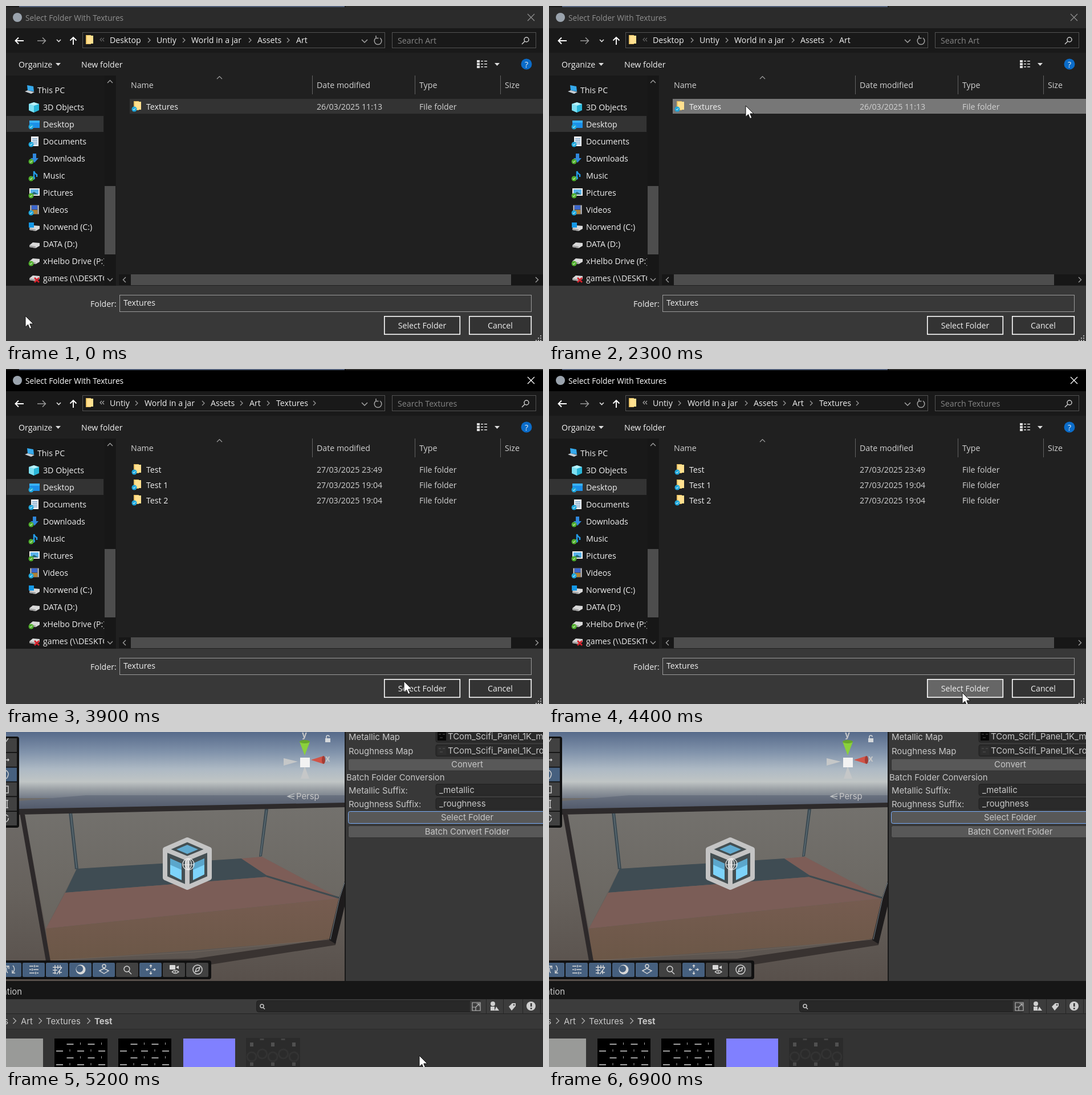
Animation, 942 px wide and 588 px high, one loop 7000 ms. Source, as an HTML page:

```html
<!DOCTYPE html>
<html lang="en">
<head>
<meta charset="utf-8">
<title>Select Folder</title>
<style>
html, body { margin: 0; width: 100%; height: 100%; overflow: hidden; background: #202020; }
svg { display: block; width: 100%; height: 100%; }
text { font: 14.2px "Open Sans", "Noto Sans", sans-serif; fill: #f0f0f0; white-space: pre; }
.title { font-size: 13.7px; }
.editor text { font: 14.9px Inter, Roboto, sans-serif; fill: #c8c8c8; }
.mid { text-anchor: middle; }
.end { text-anchor: end; }
text.dim { fill: #868686; }
text.soft { fill: #d2d2d2; }
.editor text.bold { font-weight: 700; }
.timed { opacity: 0; }
</style>
</head>
<body>
<svg id="stage" viewBox="0 0 942 588" preserveAspectRatio="none"></svg>
<script>
const LOOP = 7000;
const at = ms => (ms / LOOP * 100).toFixed(3) + '%';
const rules = [];

const rect = (x, y, w, h, fill, more = '') => `<rect x="${x}" y="${y}" width="${w}" height="${h}" fill="${fill}" ${more}/>`;
const poly = (points, fill, more = '') => `<polygon points="${points}" fill="${fill}" ${more}/>`;
const path = (d, stroke = '#c8c8c8', width = 1.5, fill = 'none') =>
  `<path d="${d}" stroke="${stroke}" stroke-width="${width}" fill="${fill}"/>`;
const disc = (x, y, r, fill, more = '') => `<circle cx="${x}" cy="${y}" r="${r}" fill="${fill}" ${more}/>`;
const text = (x, y, s, cls = '') => `<text x="${x}" y="${y}" class="${cls}">${s}</text>`;
const move = (x, y, body) => `<g transform="translate(${x} ${y})">${body}</g>`;
const chevron = (x, y, color = '#9a9a9a', s = 4) => path(`M${x - s / 2} ${y - s}l${s} ${s}l${-s} ${s}`, color, 1.3);
const gradient = (id, stops) => `<linearGradient id="${id}" x2="0" y2="1">` +
  stops.map(([o, c]) => `<stop offset="${o}" stop-color="${c}"/>`).join('') + '</linearGradient>';

// Wraps content so that it is visible only during the given spans of the loop.
function during(spans, body) {
  const name = 'span' + rules.length;
  const stops = spans.map(([a, b]) => `${at(a)}{opacity:1}${b < LOOP ? at(b) + '{opacity:0}' : ''}`).join('');
  const first = spans[0][0] ? '0%{opacity:0}' : '';
  const last = spans.at(-1)[1] < LOOP ? '100%{opacity:0}' : '100%{opacity:1}';
  rules.push(`@keyframes ${name}{${first}${stops}${last}}.${name}{animation:${name} ${LOOP}ms step-end infinite}`);
  return `<g class="timed ${name}">${body}</g>`;
}

/* ---------- editor window ---------- */
function scene() {
  let s = rect(0, 0, 594, 118, 'url(#sky)') + rect(0, 116, 594, 321, 'url(#ground)');
  s += poly('23,121 140,111 594,111 594,126 23,135', 'url(#lid)');
  s += poly('33,145 594,131 594,262 584,291 449,219 413,222 124,240 70,345', 'url(#wall)');
  s += poly('110,141 116,141 127,240 121,241', '#3c4a52') + path('M113.5 143L124 239', '#6c7d84', 1);
  s += poly('454,135 460,135 449,218 444,219', '#3c4a52') + path('M457 137L446.5 217', '#6c7d84', 1);
  s += poly('124,240 413,222 461,254 104,282', '#3f4c53');
  s += poly('413,222 449,219 584,291 461,254', '#7d5d57');
  s += poly('104,282 461,254 584,292 70,345', '#7b5d57');
  s += path('M457 253L584 291', '#3f4b50', 3);
  s += poly('70,345 584,292 567,365 75,402', 'url(#front)');
  s += poly('22,135 594,124 594,132 22,145', '#2d2a2b');
  s += poly('24,142 33,145 78,402 70,402', '#2d292a');
  s += poly('70,402 330,398 567,363 579,366 578,374 360,408 70,408', '#393331');
  s += poly('594,262 594,306 578,372 567,365 584,292', '#1d1b1c');
  s += path('M594 264L585 292L569 364', '#78858d', 1) + path('M78 401L330 386L567 364', '#776a61', .7);
  return s + sceneCube() + axes();
}

function sceneCube() {
  const side = poly('-30,-9 -10,0 -10,29 -30,19', '#7dd3fa') + poly('-30,-9 -10,0 -10,11 -30,2', '#5ba6cb');
  return poly('318,189 357,206 357,256 318,273 279,256 279,206', '#454f52') +
    poly('318,198 337,206 318,214 299,206', '#62abd0') +
    move(318, 231, side + `<g transform="scale(-1 1)">${side}</g>`) +
    `<g stroke-linejoin="round">${path('M318 189L357 206V256L318 273L279 256V206ZM279 206L318 222L357 206M318 222V273', '#c4c4c4', 8)}</g>` +
    path('M310 232a10 10 0 1 0 20 0a10 10 0 1 0-20 0M310 233h20M320 222v20M320 222c-7 5-7 15 0 20c7-5 7-15 0-20', '#eee', 1.2);
}

function axes() {
  return poly('487,46 512,52 487,59', '#c5c7c8') + poly('524,60 532,82 517,82', '#c5c7c8') +
    poly('515,17 533,17 524,41', '#8bd13b') + `<ellipse cx="524" cy="17" rx="9" ry="3" fill="#68a62c"/>` +
    poly('535,49 557,42 557,56', '#d05448') + `<ellipse cx="557" cy="49" rx="3" ry="7" fill="#a33c34"/>` +
    rect(516, 45, 17, 17, '#f2f2f2') + text(519, 10, 'y', 'bold') + text(560, 52, 'x', 'bold') +
    rect(560, 11, 9, 7, '#d5d8db') + path('M562 11V8.500a2.500 2.500 0 0 1 5 0', '#d5d8db') +
    path('M506 108L494 113L506 118M495 113h11', '#bfc2c4', 1.3) + text(509, 118, 'Persp');
}

function toolbars() {
  const blue = '#46607f', grey = '#414141';
  let s = rect(-5, 8, 28, 160, '#111', 'rx="4"');
  const marks = ['M0 17l4-6', 'M0 49h5m-2-2l2 2l-2 2', 'M0 67q5 4 4 8q-1 5-4 7', 'M0 95h4v12h-4', 'M0 120h4m-2 0v13m-2 0h4', 'M0 145l4 3m-4 10q5-3 4-7'];
  marks.forEach((d, i) => s += rect(-4, 11 + i * 25.8, 23, 24, i === 2 ? blue : grey) + path(d, '#d0d0d0', 1.4));
  s += rect(-5, 401, 365, 33, '#111', 'rx="4"');
  const icons = [
    'M-5 6a8 8 0 0 1 1-12m-4 0h5v5M4-7a8 8 0 0 1 0 12m4 1h-5v-5',
    'M-8-6h7M3-6h5M-8 0h3M-1 0h9M-8 6h9M5 6h3M1-8v4M-3-2v4M3 4v4',
    'M-4-8v16M1-8v7M5-8v5M-8-4h16M-8 1h8M-8 6h6M-1 8l9-12M4 8v-6M8 5h-5',
    '',
    'M-8 2l8-4l8 4l-8 5zM-3-6a3 3 0 1 1 6 0a3 3 0 1 1-6 0',
    'M4-1a5 5 0 1 1-10 0a5 5 0 1 1 10 0M2 3l5 5',
    'M0-8v5M0 3v5M-8 0h5M3 0h5M-2-6l2-2l2 2M-2 6l2 2l2-2M-6-2l-2 2l2 2M6-2l2 2l-2 2',
    'M-4 4q6-5 12 0q-6 5-12 0M1 4h2',
    'M8 0a8 8 0 1 1-16 0a8 8 0 1 1 16 0M-4 4l2-6l6-2l-2 6z'];
  const solids = {
    3: disc(0, 0, 8.5, '#d8d8d8') + disc(-1.8, -1.2, 6, blue),
    7: rect(-8, -8, 10, 8, '#d8d8d8', 'rx="1"') + poly('3,-4 8,-7 8,-1', '#d8d8d8')
  };
  icons.forEach((d, i) =>
    s += rect(-12 + i * 41, 405, 39, 25, i < 5 || i === 6 ? blue : grey, 'rx="2"') +
      move(8 + i * 41, 417, path(d, '#d8d8d8', 1.4) + (solids[i] || '')));
  return s;
}

function inspector() {
  const field = y => rect(754, y, 200, 20, '#2a2a2a', 'stroke="#202020" rx="3"');
  const button = (y, label, x, more = '') => rect(600.5, y, 420, 21, '#585858', `rx="3" stroke="#303030" ${more}`) + text(x, y + 15, label, 'mid');
  const thumb = (y, c) => rect(757, y, 15, 15, c) + path(`M759 ${y + 4}h4m3 0h4M761 ${y + 10}h5`, '#555', 1);
  return rect(594, 0, 2, 437, '#191919') + rect(596, 0, 346, 437, '#383838') +
    field(-2) + field(22.5) + thumb(0, '#060606') + thumb(25, '#2f2f2f') +
    text(601, 14, 'Metallic Map') + text(775, 13, 'TCom_Scifi_Panel_1K_metallic') +
    text(601, 38.5, 'Roughness Map') + text(775, 37.5, 'TCom_Scifi_Panel_1K_roughness') +
    button(47, 'Convert', 809) + text(597, 84.5, 'Batch Folder Conversion') +
    field(91.5) + text(601, 107.5, 'Metallic Suffix:') + text(760, 106.5, '_metallic') +
    field(116) + text(601, 131.5, 'Roughness Suffix:') + text(760, 130.5, '_roughness') +
    button(139.5, 'Select Folder', 809, 'style="stroke:#7baefa"') + button(164.5, 'Batch Convert Folder', 809);
}

function panelTile(x) {
  let dashes = '', ticks = '';
  for (let row = 0; row < 4; row++)
    for (let col = 0; col < 3; col++) {
      const cx = x + 9 + col * 37 + (row % 2 ? 0 : 18.5), y = 548 + row * 12;
      if (cx + 7 < x + 93) dashes += `M${cx - 6} ${y}h12`;
      if (cx + 19 < x + 93) ticks += `M${cx + 18} ${y - 3}v4`;
    }
  return rect(x, 538, 93, 50, '#000') + path(dashes, '#d5d5d5', 1.6) + path(ticks, '#a0a0a0', 1);
}

function project() {
  let s = rect(0, 437, 942, 32, '#161616') + text(28, 460.5, 'Animation', 'end') +
    rect(0, 469, 942, 25, '#3c3c3c') + rect(0, 494, 942, 1, '#242424') + rect(0, 495, 942, 27, '#383838') +
    rect(0, 521, 942, 67, '#333') + rect(0, 521, 942, 1, '#2b2b2b');
  s += rect(439.5, 471.5, 395, 20, '#282828', 'rx="4" stroke="#1e1e1e"') + rect(814, 472, 22, 19, '#3c3c3c') +
    path('M452 481a3 3 0 1 1-6 0a3 3 0 1 1 6 0M451 483.500l3 3');
  s += path('M818 475h14v14h-14zM818 483h6v6M824 483l6-6M825.500 477h4.500v4.500', '#b8b8b8', 1.2);
  for (const x of [842, 872, 906, 937]) s += rect(x, 469, 1, 25, '#262626');
  s += disc(854, 477, 4, '#d0d0d0') + rect(850, 482, 7, 7, '#d0d0d0') + poly('860,482 865,489 857,489', '#d0d0d0');
  s += poly('882,482 888,476 894,476 894,481 887,489', '#d0d0d0') + disc(891, 479, 1.3, '#3c3c3c');
  s += disc(921, 481, 8, '#d0d0d0') + rect(920, 476, 2.5, 6, '#333') + rect(920, 484, 2.5, 2.5, '#333');
  s += text(4, 512.5, 'Assets', 'end') + text(26, 512.5, 'Art') + text(70, 512.5, 'Textures') + text(155, 512.5, 'Test', 'bold');
  for (const x of [15, 60, 145]) s += chevron(x, 507, '#b0b0b0', 5);
  s += rect(0, 538, 65, 50, '#999a98') + panelTile(85) + panelTile(197) +
    rect(311, 538, 91, 50, '#8080ff') + rect(421, 537, 95, 51, '#2b2b2b');
  for (let i = 0; i < 5; i++) {
    const x = 431 + i * 18.5;
    s += disc(x, i % 2 ? 565 : 570, 8, 'none', 'stroke="#333" stroke-width="3"') +
      (i % 2 ? rect(x - 4, 538, 7, 3, '#444') : rect(x - 3, 545, 6, 7, '#505050') + rect(x - 3, 580, 6, 6, '#4a4a4a'));
  }
  return s;
}

/* ---------- folder dialog ---------- */
const badge = (x, y, color) => disc(x, y, 4.5, color) + path(`M${x - 2} ${y}l1.500 1.700l2.500-3.300`, '#fff', 1);
const folder = (x, y) => rect(x, y, 9, 16, '#e7bf61') + rect(x + 2, y + 1, 11, 14, '#ffe08f');
const CYAN = '#1ea7dc', GREEN = '#4fae2b';
const drive = poly('0,5 6,0 18,1 18,6 11,10 0,8', '#d9d9d9') + poly('0,5 11,7 11,10 0,8', '#a5a5a5');

function treeIcon(kind) {
  switch (kind) {
    case 'pc': return poly('4,0 15,2 16,11 5,9', '#35a9ec') + poly('0,11 5,9 17,12 11,15', '#c7ced4');
    case 'cube': return poly('9,0 18,3 18,14 9,18 0,14 0,3', '#29b6d8') + poly('0,3 9,6 9,18 0,14', '#7ee0f2') + poly('9,0 18,3 9,6 0,3', '#b9f1fa');
    case 'desktop': return rect(1, 2, 18, 13, '#1c8fe8') + rect(1, 2, 18, 4, '#39b2fa') + badge(4, 13, CYAN);
    case 'doc': return rect(4, 0, 13, 17, '#f1f3f5') + path('M6 4h9M6 7h9M6 10h9M6 13h9', '#3d7eb5', 1.2) + badge(4, 14, CYAN);
    case 'down': return path('M10 0v10', '#2f87dc', 6) + poly('3,8 17,8 10,16', '#2f87dc') + badge(4, 14, GREEN);
    case 'music': return path('M9 14V1q1 4 5 6v4', '#239be6', 2.5) + `<ellipse cx="7" cy="13" rx="4" ry="3" fill="#239be6"/>` + badge(4, 14, GREEN);
    case 'picture': return rect(1, 1, 18, 13, '#f2f2f2') + rect(3, 3, 14, 9, '#5ab4ec') + poly('3,12 9,7 17,12', '#2a6a78') + badge(4, 14, GREEN);
    case 'video': return rect(2, 0, 16, 17, '#4d4d55') + rect(5, 1, 10, 7, '#3b67cd') + rect(5, 9, 10, 7, '#b18235') + path('M3.500 1v15M16.500 1v15', '#ddd', 1.5) + badge(4, 14, CYAN);
    case 'system': return move(1, 6, drive) + rect(0, 1, 9, 9, '#1498e6');
    case 'cloud': return move(1, 4, drive) + badge(4, 13, GREEN);
    case 'network': return move(1, 4, drive) + path('M10 8l8 8M18 8l-8 8', '#d81f2a', 2.7);
    default: return move(1, 6, drive);
  }
}

function tree() {
  const items = [['pc', 'This PC'], ['cube', '3D Objects'], ['desktop', 'Desktop'], ['doc', 'Documents'], ['down', 'Downloads'],
    ['music', 'Music'], ['picture', 'Pictures'], ['video', 'Videos'], ['system', 'Norwend (C:)'], ['drive', 'DATA (D:)'],
    ['cloud', 'xHelbo Drive (P:)'], ['network', 'games (\\\\DESKTOP)']];
  let s = rect(0, 122, 195, 369, '#191919') + rect(1, 193, 170, 28, '#333') +
    during([[1500, 1700]], rect(0, 462, 172, 29, '#4d4d4d'));
  let arrows = path('M9 145l4.500 4.500l4.500-4.500', '#777', 1.3), rows = '';
  items.forEach(([kind, label], i) => {
    const y = 147 + i * 30;
    rows += move(i ? 40 : 33, y - 8, treeIcon(kind)) + text(i ? 65 : 55, y + 5.5, label);
    if (i) arrows += chevron(24, y + 1, '#777');
  });
  s += `<g class="arrows">${arrows}</g><g clip-path="url(#pane)">${rows}</g>`;
  return s + rect(173, 122, 19, 369, '#171717') + rect(173, 316, 19, 120, '#4d4d4d') +
    path('M178 135l4.500-4.500l4.500 4.500M178 478l4.500 4.500l4.500-4.500', '#a0a0a0', 1.4) + rect(193, 122, 3, 369, '#202020');
}

function crumbs(names, ends, tone, query) {
  let s = path('M168 56l-3 3l3 3M172 56l-3 3l3 3', tone, 1.1);
  names.forEach(([x, name]) => s += text(x, 65, name));
  ends.forEach(x => s += chevron(x, 60));
  return s + text(687, 66, query, 'dim');
}

const fileRow = (y, name, date) => folder(224, y - 9) + badge(225, y + 5, CYAN) +
  text(246, y + 5.5, name) + text(545, y + 5.5, date, 'soft') + text(725, y + 5.5, 'File folder', 'soft');

function titleBar(bg, ink) {
  return rect(0, 2, 942, 37, bg) + disc(20, 20, 8, '#9aa3ad') +
    `<text x="34" y="25.500" class="title" style="fill:${ink}">Select Folder With Textures</text>` +
    path('M915 14l12 12M927 14l-12 12', ink, 1.3);
}

function dialog() {
  let s = rect(0, 0, 942, 588, '#202020') + rect(0, 0, 942, 2, '#1b1b1b') + rect(23, 0, 571, 2, '#53617b') + rect(596, 0, 346, 2, '#303030');
  s += during([[0, 2600]], titleBar('#2b2b2b', '#8f8f8f')) + during([[2600, LOOP]], titleBar('#000', '#fff'));
  s += rect(0, 39, 942, 43, '#191919');
  s += path('M31 61H17M22 55.500l-5.500 5.500l5.500 5.500M118 68V55M112.500 60.500l5.500-5.500l5.500 5.500', '#fff', 1.9) +
    path('M55 61h14M64 55.500l5.500 5.500l-5.500 5.500', '#9b9b9b', 1.5) + path('M89 59l3.500 3.500l3.500-3.500', '#ddd', 1.7);
  s += rect(134.5, 46.5, 530, 27, '#191919', 'stroke="#535353"') + rect(677.5, 46.5, 252, 27, '#191919', 'stroke="#535353"');
  s += folder(140, 51) + path('M624 59l5 5l5-5', '#a5a5a5', 1.5) + path('M649 56a6.300 6.300 0 1 0 7 0M649 52v4.500h4.500', '#a5a5a5', 1.5) +
    path('M917 59a4 4 0 1 1-8 0a4 4 0 1 1 8 0M910 62l-5 5', '#ccc', 1.5);
  s += during([[0, 3000]], crumbs([[182, 'Desktop'], [264, 'Untiy'], [325, 'World in a jar'], [441, 'Assets'], [509, 'Art']],
    [251, 312, 428, 495], '#6a6a6a', 'Search Art'));
  s += during([[3000, LOOP]], crumbs([[182, 'Untiy'], [243, 'World in a jar'], [359, 'Assets'], [427, 'Art'], [474, 'Textures']],
    [229, 346, 413, 460, 541], '#b0b0b0', 'Search Textures'));

  s += text(22, 108, 'Organize') + poly('87,100 96,100 91.5,105', '#ddd') + text(132, 108, 'New folder');
  for (let i = 0; i < 3; i++) s += rect(826, 95 + i * 5, 5, 4, '#ddd') + rect(833, 96 + i * 5, 4, 1.5, '#ddd') + rect(839, 96 + i * 5, 5, 1.5, '#ddd');
  s += poly('857,100 866,100 861.5,105', '#ddd') + disc(913, 102, 9.5, '#0b6cc9') + text(913, 107.5, '?', 'mid');

  s += tree();
  s += path('M370 128l4.500-4.500l4.500 4.500', '#a0a0a0', 1.2);
  [[219, 'Name'], [545, 'Date modified'], [725, 'Type'], [875, 'Size']].forEach(([x, name], i) =>
    s += text(x, 144, name, 'soft') + (i ? rect(x - 8, 122, 1, 33, '#636363') : ''));
  s += during([[0, 3000]], rect(217, 163, 725, 26, '#333') +
    during([[2150, 3000]], rect(217, 163, 725, 26, '#777')) + fileRow(176, 'Textures', '26/03/2025 11:13'));
  s += during([[3000, LOOP]], fileRow(176, 'Test', '27/03/2025 23:49') +
    fileRow(203, 'Test 1', '27/03/2025 19:04') + fileRow(230, 'Test 2', '27/03/2025 19:04'));
  s += rect(198, 471, 744, 19, '#171717') + rect(219, 471, 667, 19, '#4d4d4d') +
    path('M210 476l-4.500 4.500l4.500 4.500M929 476l4.500 4.500l-4.500 4.500', '#a0a0a0', 1.4);

  s += rect(0, 491, 942, 97, '#383838') + text(148, 528, 'Folder:') +
    rect(199.5, 507.5, 722, 29, '#383838', 'stroke="#9b9b9b"') + text(206, 526, 'Textures');
  s += rect(664, 545, 132, 31, '#333') + during([[4000, LOOP]], rect(664, 545, 132, 31, '#666')) +
    rect(663.8, 544.8, 132.5, 31.5, 'none', 'stroke="#fff" stroke-width="1.6"') + text(730, 566, 'Select Folder', 'mid') +
    rect(812.8, 544.8, 108.5, 31.5, '#333', 'stroke="#fff" stroke-width="1.6"') + text(867, 566, 'Cancel', 'mid');
  for (let i = 0; i < 3; i++)
    for (let j = 0; j <= i; j++) s += rect(937 - j * 4, 578 + i * 4, 2, 2, '#b5b5b5');
  return s;
}

/* ---------- pointer ---------- */
const arrow = path('M0 0V19.500L4.600 15.200L7.600 22.500L10.800 21.200L7.800 14H14Z', '#111', 1, '#fff');
const hand = path('M-2.500 2.500a2.500 2.500 0 0 1 5 0v7c1-1 4-.5 4 1 1-1 3.500-.5 3.500 1 1-.8 3 0 3 2v5c0 3-1.500 4-2 8h-10c-1-4-5-7-7.500-11-1-2 1-3.500 3-2l1.500 2z', '#111', 1, '#fff');
const route = [[0, 34, 544], [1300, 34, 544], [1600, 122, 449], [2150, 345, 175], [3300, 345, 175],
  [3900, 698, 548], [4400, 725, 568], [5300, 725, 568], [5700, 735, 592], [LOOP, 735, 592]];
rules.push(`@keyframes route{${route.map(([ms, x, y]) => `${at(ms)}{transform:translate(${x}px,${y}px)}`).join('')}}
.pointer{animation:route ${LOOP}ms linear infinite}
@keyframes arrows{0%,${at(1450)}{opacity:0}${at(1600)}{opacity:.3}${at(1850)}{opacity:.6}${at(2200)},100%{opacity:0}}
.arrows{animation:arrows ${LOOP}ms linear infinite}`);

document.getElementById('stage').innerHTML = '<defs>' +
  gradient('sky', [[0, '#566a8a'], [.3, '#8193ab'], [.55, '#adb9c4'], [.74, '#c0c5c5'], [.86, '#979da2'], [1, '#6f7785']]) +
  gradient('ground', [[0, '#6f6c69'], [.5, '#67625d'], [1, '#58504b']]) +
  gradient('wall', [[0, '#73716d'], [1, '#69655f']]) +
  gradient('lid', [[0, '#6a7280'], [1, '#525a6b']]) +
  gradient('front', [[0, '#765c50'], [1, '#6b5747']]) +
  '<clipPath id="pane"><rect x="0" y="122" width="172" height="369"/></clipPath></defs>' +
  `<g class="editor">${scene()}${toolbars()}${inspector()}${project()}</g>` +
  during([[0, 5100]], dialog()) +
  `<g class="pointer">${during([[0, 1500], [1800, 5700]], arrow)}${during([[1500, 1800]], hand)}</g>`;
document.head.appendChild(document.createElement('style')).textContent = rules.join('\n');
</script>
</body>
</html>
```
